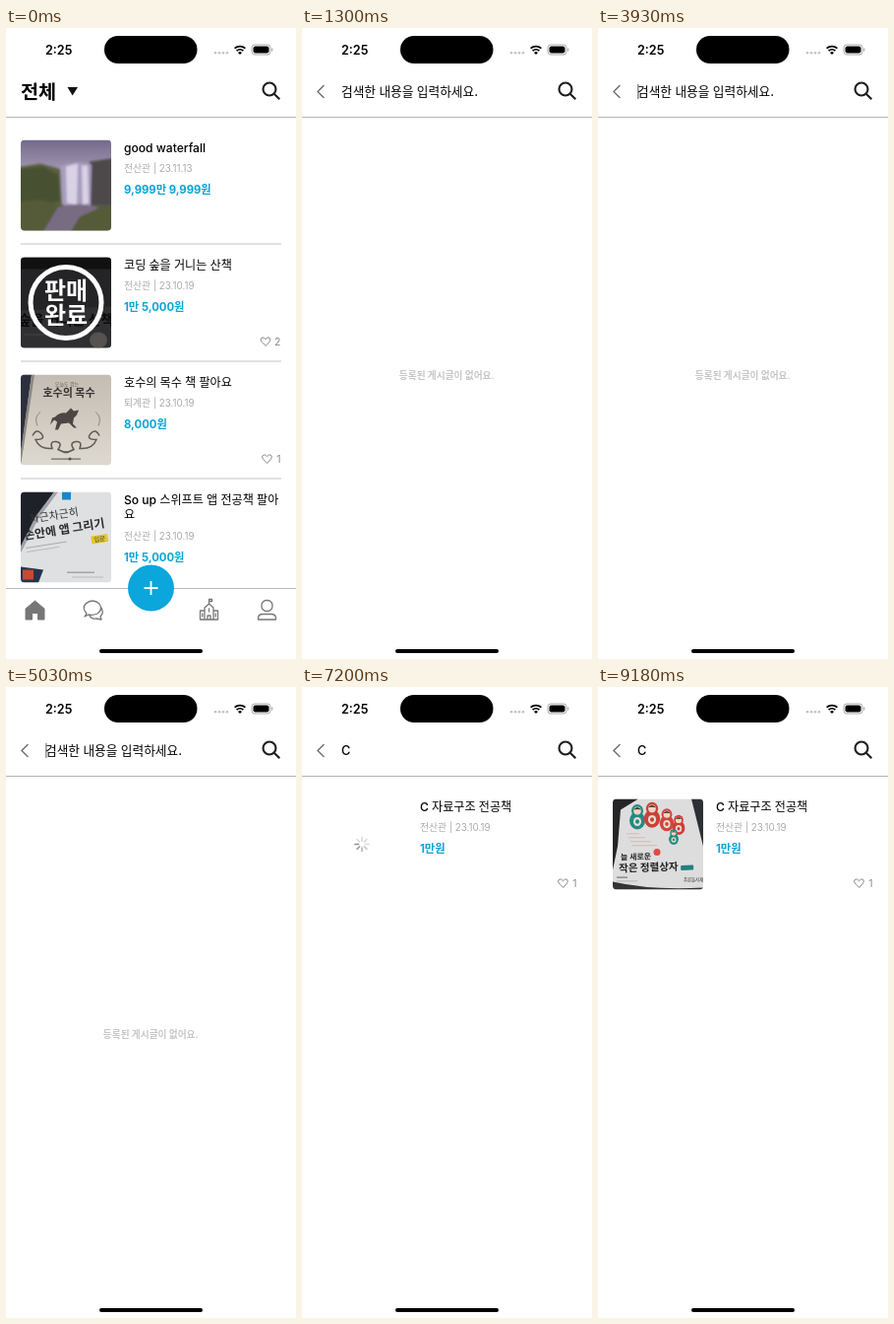
An HTML page for the animation above (9790 ms loop, 295 by 640 pixels).

```html
<!DOCTYPE html>
<html lang="ko">
<head>
<meta charset="utf-8">
<style>
html, body { margin: 0; width: 100%; height: 100%; overflow: hidden; background: #fff; }
svg { display: block; font-family: Inter, "Noto Sans CJK KR", "Noto Sans CJK", sans-serif; }
.title { font-size: 12.1px; font-weight: 500; }
.meta { font-size: 9.8px; fill: #aaa; }
.price { font-size: 11.3px; font-weight: 700; fill: #08a4d5; }
.likes { font-size: 10.5px; fill: #888; }
.line { fill: none; stroke: #767676; stroke-width: 1.3; stroke-linejoin: round; stroke-linecap: round; }
.mid { text-anchor: middle; }
.bold { font-weight: 700; }
</style>
</head>
<body>
<svg id="stage" width="295" height="640" viewBox="0 0 295 640"></svg>
<script>
const LOOP = 9790;
const SEARCH = 1300, TYPED = 5800, RESULT = 7200, FADE = 7320, LOADED = 7550;
// time and opacity of the text cursor
const BLINK = [
  [0, 0], [2380, 1], [2950, 0], [3260, .5], [3380, 1], [3930, .5], [4050, 0],
  [4250, .5], [4360, 1], [5030, .45], [5130, 0], [5360, .5], [5480, 1],
  [6380, .5], [6490, 0]
];

const text = (x, y, cls, str, extra = '') => `<text x="${x}" y="${y}" class="${cls}" ${extra}>${str}</text>`;
const path = (d, fill, extra = '') => `<path d="${d}" fill="${fill}" ${extra}/>`;
const rect = (x, y, w, h, fill, extra = '') => `<rect x="${x}" y="${y}" width="${w}" height="${h}" fill="${fill}" ${extra}/>`;
const oval = (x, y, rx, ry, fill) => `<ellipse cx="${x}" cy="${y}" rx="${rx}" ry="${ry}" fill="${fill}"/>`;

const waterfall = rect(0, 0, 92, 92, 'url(#sky)') + `<g filter="url(#soft)">` +
  path('M-5 28L20 24L42 30L44 60L70 66L98 52V98H-5z', '#5a6040') +
  path('M-5 30L22 27L38 35L40 62L-5 70z', '#465131') +
  path('M70 22L98 18V66L70 66z', '#4d4a4c') +
  path('M40 27Q56 20 72 25L71 67Q56 74 42 65z', '#a79dbd') +
  path('M46 27L58 24L57 66L47 64z M62 26L68 26L69 64L63 66z', '#d9d2e6') +
  path('M-5 64Q25 56 45 70L98 66V98H-5z', '#555a38') +
  path('M38 68Q60 62 80 69L60 78L48 98H20z', '#786c82') + '</g>';

const soldBook = rect(0, 0, 92, 92, '#242326') + rect(0, 0, 92, 12, '#111') +
  path('M0 54L92 50V92H0z', '#2f2e31') +
  text(46, 68, 'mid bold', '숲을 거니는 산책', 'font-size="14" fill="#090909"') +
  oval(79, 84, 9, 8, '#55524f') + rect(4, 78, 20, 1, '#444') +
  '<circle cx="46" cy="46" r="36" fill="none" stroke="#fff" stroke-width="5"/>' +
  text(46, 42.5, 'mid bold', '판매', 'font-size="24" fill="#fff"') +
  text(46, 67.5, 'mid bold', '완료', 'font-size="24" fill="#fff"');

const swirl = 'M12 62q4 -8 9 -2t-6 6q4 10 17 9q-3 -8 4 -7t2 8q5 3 10 3';
const ornament = `<path d="${swirl}" fill="none" stroke="#5f5a56" stroke-width="1.5"/>`;
const valueBook = rect(0, 0, 92, 92, 'url(#paper)') +
  path('M0 0H11L4 52L0 80z', '#2c303d') + path('M11 0H14L5 60L0 92V78z', '#8c8986') +
  text(47, 11, 'mid', '오늘도 깎는', 'font-size="5" fill="#675f58"') +
  text(49, 22, 'mid bold', '호수의 목수', 'font-size="11" fill="#37322f"') +
  path('M35 43q5 -5 11 -4l5 -5l3 3l5 -1l-2 5l-3 3l-1 6l4 4h-3l-5 -5l-8 1l-3 6h-3l2 -8l-3 -2l-4 5l2 -7z', '#4c4744') +
  ornament + `<g transform="matrix(-1 0 0 1 92 0)">${ornament}</g>` +
  path('M20 38q-7 5 -3 14M76 38q7 5 3 14', 'none', 'stroke="#8d857d"') +
  rect(31, 85, 30, 1.3, '#777069') + oval(50, 85.5, 1.5, 1.5, '#554e48');

const appBook = rect(0, 0, 92, 92, '#dfe0e1') +
  path('M0 0H34L15 26L0 56z', '#1e2128') + path('M34 0H38L18 27L0 62V55L15 25z', '#a0a3a8') +
  rect(42, 0, 9, 8, '#1688cb') +
  `<g transform="rotate(-9 46 46)">` +
  text(12, 26, '', '차근차근히', 'font-size="11" fill="#333" font-weight="500"') +
  text(4, 42, 'bold', '손안에 앱 그리기', 'font-size="12" fill="#292b2e"') +
  rect(71, 49, 17, 8, '#e6c62f') + text(79.5, 55.5, 'mid', '입문', 'font-size="6.5" fill="#444"') +
  rect(4, 50, 42, 1, '#aaa') + rect(4, 54, 34, 1, '#bbb') + '</g>' +
  path('M0 76L23 79L18 92H0z', '#26334c') + rect(2, 79, 11, 10, '#ca4931') +
  rect(47, 81, 28, 1.5, '#a6a6a6') + rect(52, 86, 32, 1, '#bbb');

const doll = (x, y, s, body) => `<g transform="translate(${x} ${y}) scale(${s})">` +
  oval(0, 3, 8, 9, body) + oval(0, -7, 6, 6.5, body) + oval(0, -7, 3.8, 4, '#f1d4c1') +
  path('M-4 -8Q0 -13 4 -8Q0 -9 -4 -8z', '#453630') + oval(0, 4, 4, 4.5, '#e9dfd3') +
  oval(0, 4, 2, 2.2, body) + '</g>';
const cBook = rect(0, 0, 92, 92, '#dedddd') +
  path('M0 0H26L8 11L5 48L0 72z', '#252528') + path('M80 0H92V48z', '#2d3035') +
  doll(25, 19, 1, '#238b83') + doll(40, 17, 1.02, '#cb4038') + doll(55, 22, .9, '#d2443c') +
  doll(67, 27, .8, '#cf3d37') + doll(62, 39, .62, '#238b83') +
  oval(45, 54, 3.5, 3.5, '#df4b46') +
  [0, 1, 2, 3].map(i => rect(14 + i * 2, 35 + i * 4, 13 + i * 4, .7, '#c9aaa2')).join('') +
  `<g transform="rotate(-2 40 65)">` +
  text(8, 61, 'bold', '늘 새로운', 'font-size="8" fill="#292929"') +
  text(6, 73, 'bold', '작은 정렬상자', 'font-size="10.5" fill="#202020"') +
  rect(69, 68.5, 13, 5, '#21817e', 'rx="1"') + '</g>' +
  rect(4, 79, 11, 1.2, '#777') + rect(4, 83, 21, .8, '#aaa') +
  text(72, 83.5, '', '푸른들서재', 'font-size="4.4" fill="#333"') +
  path('M0 84Q40 93 92 90V92H0z', '#363336');

const photo = (y, art, id = '') =>
  `<g ${id} transform="translate(15 ${y})" clip-path="url(#thumb)">${art}</g>`;

// one list entry; an extra title line pushes the details down
function entry(y, titles, place, price, likes) {
  const low = (titles.length - 1) * 16;
  const drop = low ? 135 : 119;
  let out = titles.map((s, i) => text(120, y + 12 + i * 15.3, 'title', s)).join('');
  out += text(120, y + drop - 86.5, 'meta', place) + text(120, y + drop - 65, 'price', price);
  if (likes) out += text(279.5, y + 89, 'likes', likes, 'text-anchor="end"') +
    `<path class="line" style="stroke:#888;stroke-width:1" transform="translate(${likes == 1 ? 265.5 : 264} ${y + 85.5})"
      d="M0 4.2L-4 .2Q-6 -2.2 -4 -3.8Q-1.8 -5 0 -2.3Q1.8 -5 4 -3.8Q6 -2.2 4 .2z"/>`;
  return out;
}

const feed = [
  [waterfall, ['good waterfall'], '전산관 | 23.11.13', '9,999만 9,999원'],
  [soldBook, ['코딩 숲을 거니는 산책'], '전산관 | 23.10.19', '1만 5,000원', 2],
  [valueBook, ['호수의 목수 책 팔아요'], '퇴계관 | 23.10.19', '8,000원', 1],
  [appBook, ['So up 스위프트 앱 전공책 팔아', '요'], '전산관 | 23.10.19', '1만 5,000원']
].map(([art, ...info], i) => {
  const y = 113.5 + i * 119;
  return photo(y, art) + entry(y, ...info) + (i < 3 ? rect(15, y + 105, 265, 1, '#c4c4c4') : '');
}).join('');

const tabs = rect(0, 568, 295, 72, '#fff') + rect(0, 568, 295, 1, '#b9b9b9') +
  path('M29.5 581L39 589V600H32.5V593.5H26.5V600H20V589z', '#767676', 'stroke="#767676" stroke-linejoin="round"') +
  `<g class="line">
    <path d="M82 594Q77 588 81 584Q88 578 95 584Q99 590 93 594Q88 596 84 595L80 597z"/>
    <path d="M97 588Q100 593 96 597L97 600L92 599Q87 600 85 596"/>
    <path d="M202 600V588L206.500 584L211 588V600zM202 591H197.500V600H215.500V591H211M206.500 584V579.500H209.500V581.500H206.500M205 600V596H208V600M206.500 589V592M199.800 594V597M213.200 594V597"/>
    <rect x="260" y="580.500" width="11" height="11" rx="5"/>
    <path d="M256.500 600V598Q257 594.500 261 594.500H270Q274 594.500 274.500 598V600z"/>
  </g>
  <circle cx="147.500" cy="568" r="23.500" fill="#0aa6dc"/>
  <path d="M140.500 568H154.500M147.500 561V575" stroke="#fff" stroke-width="1.800"/>`;

const chrome = text(40, 26.5, '', '2:25', 'font-size="12.6" font-weight="600"') +
  rect(100, 8, 94.5, 28, '#000', 'rx="14"') +
  [0, 1, 2, 3].map(i => oval(213 + i * 4, 25.3, 1.3, 1.3, '#c2c2c2')).join('') +
  path('M232.600 20.700A8 8 0 0 1 243.400 20.700M234.600 23.200A5 5 0 0 1 241.400 23.200', 'none', 'stroke="#000" stroke-width="1.8"') +
  path('M238 27L236 25A3 3 0 0 1 240 25z', '#000') +
  rect(250, 17, 19, 10, 'none', 'rx="3" stroke="#aaa"') + rect(251.5, 18.5, 16, 7, '#000', 'rx="2"') +
  rect(270.2, 20.3, 1.2, 3.4, '#aaa', 'rx=".6"') +
  '<g fill="none" stroke="#1c1c1c" stroke-width="2.100"><circle cx="268" cy="62" r="6.500"/><path d="M272.700 66.700L278.300 72.300"/></g>' +
  rect(0, 90, 295, 1, '#b5b5b5') + rect(95, 630, 105, 4, '#000', 'rx="2"');

const spokes = [...Array(8).keys()].map(i =>
  `<path class="spoke" d="M0 -3.500V-7" transform="rotate(${i * 45})" stroke="#3c3c43" stroke-width="1.700" stroke-linecap="round"/>`).join('');

const $ = id => document.getElementById(id);
$('stage').innerHTML = `
<defs>
  <clipPath id="thumb"><rect width="92" height="92" rx="4"/></clipPath>
  <filter id="soft"><feGaussianBlur stdDeviation="1.300"/></filter>
  <linearGradient id="sky" x2="0" y2="1"><stop stop-color="#74698b"/><stop offset=".4" stop-color="#aaa0b8"/></linearGradient>
  <linearGradient id="paper" x2="0" y2="1"><stop stop-color="#c4bcb3"/><stop offset="1" stop-color="#ded9d0"/></linearGradient>
</defs>
<g id="home">${text(15, 72, 'bold', '전체', 'font-size="19.7"')}${path('M62.500 60H73L67.700 68.500z', '#111')}${feed}${tabs}</g>
<g id="search">
  <path class="line" style="stroke-width:1.600" d="M22 58.500L16 64.500L22 70.500"/>
  ${text(40, 69, '', '', 'id="query" font-size="12.7" font-weight="500"')}
  ${rect(40, 57, 1.6, 15, '#222', 'id="cursor"')}
  ${text(147.3, 355.5, 'mid bold', '등록된 게시글이 없어요.', 'id="empty" font-size="9.7" fill="#c6c6c6"')}
  <g id="result">
    ${entry(113.5, ['C 자료구조 전공책'], '전산관 | 23.10.19', '1만원', 1)}
    <g id="spinner" transform="translate(61 159.500)">${spokes}</g>
    ${photo(113.5, cBook, 'id="cover"')}
  </g>
</g>
${chrome}`;

const show = (id, on) => $(id).setAttribute('display', on ? 'inline' : 'none');
const fade = (id, a) => $(id).setAttribute('opacity', a);
const ticks = document.querySelectorAll('.spoke');

function draw(t) {
  show('home', t < SEARCH);
  show('search', t >= SEARCH);
  show('empty', t < RESULT);
  show('result', t >= RESULT);
  $('query').textContent = t < TYPED ? '검색한 내용을 입력하세요.' : 'C';
  $('cursor').setAttribute('x', t < TYPED ? 40 : 49.3);
  fade('cursor', BLINK.filter(([at]) => at <= t).pop()[1]);

  const shown = Math.min(1, Math.max(0, (t - FADE) / (LOADED - FADE)));
  fade('cover', shown);
  fade('spinner', 1 - shown);
  const head = 6 + Math.floor((t - RESULT) / 125);
  ticks.forEach((tick, i) => {
    const age = ((head - i) % 8 + 8) % 8;
    tick.setAttribute('opacity', Math.max(.18, .58 - age * .1));
  });
}

const start = performance.now();
function loop() {
  draw((performance.now() - start) % LOOP);
  requestAnimationFrame(loop);
}
loop();
</script>
</body>
</html>
```
